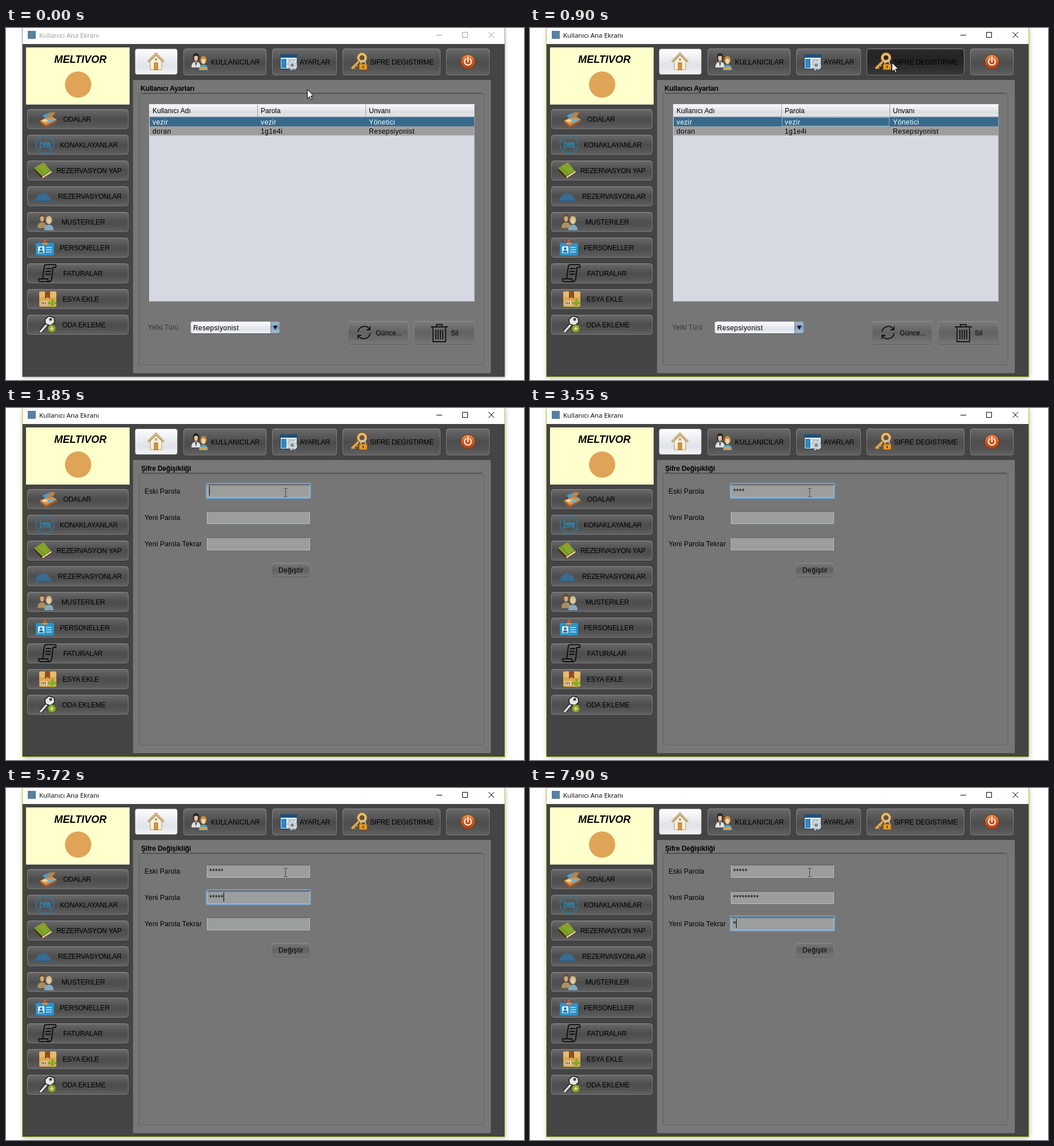
An HTML page that plays this animation: 905 by 616 pixels, repeating every 8000 ms.

```html
<!DOCTYPE html>
<html lang="tr">
<head>
<meta charset="utf-8">
<title>Kullanıcı Ana Ekranı</title>
<style>
html, body { margin: 0; width: 100%; height: 100%; overflow: hidden; background: #fff; }
svg { display: block; width: 905px; height: 616px; font: 12px "Liberation Sans", Arial, sans-serif; }
text { white-space: pre; }
.wide { letter-spacing: .4px; }
.label { letter-spacing: .15px; }
.caps { letter-spacing: -.13px; }
.bold { font-weight: bold; letter-spacing: -.17px; }
.stars { letter-spacing: .33px; }
.brand { font: italic bold 18px "Liberation Sans", sans-serif; }
.frame { fill: #444; filter: drop-shadow(1px 2px 3px rgba(0,0,0,.25)); }
.active .frame { filter: drop-shadow(1px 2px 4px rgba(0,0,0,.3)); }
.edge { fill: none; stroke: #9a9a9a; }
.active .edge { stroke: #a5cf1c; }
.title { font: 11.5px "Open Sans", "Noto Sans", sans-serif; fill: #999; }
.active .title { fill: #000; }
.sys { fill: none; stroke: #999; }
.active .sys { stroke: #000; }
</style>
</head>
<body>
<svg id="stage" viewBox="0 0 905 616" xmlns="http://www.w3.org/2000/svg"></svg>
<script>
const LOOP = 8000;
const svg = document.getElementById('stage');

// ---- drawing helpers ----
const rect = (x, y, w, h, fill, more = '') =>
  `<rect x="${x}" y="${y}" width="${w}" height="${h}" fill="${fill}" ${more}/>`;
const path = (d, fill = 'none', stroke = 'none', w = 1, more = '') =>
  `<path d="${d}" fill="${fill}" stroke="${stroke}" stroke-width="${w}" ${more}/>`;
const disc = (x, y, r, fill, more = '') =>
  `<circle cx="${x}" cy="${y}" r="${r}" fill="${fill}" ${more}/>`;
const text = (x, y, s, cls = '', fill = '') =>
  `<text x="${x}" y="${y}" class="${cls}" ${fill && `fill="${fill}"`}>${s}</text>`;
const group = (id, body) => `<g id="${id}">${body}</g>`;
const at = (x, y, body) => `<g transform="translate(${x} ${y})">${body}</g>`;
const grad = (id, ...colors) =>
  `<linearGradient id="${id}" x2="0" y2="1">${colors.map((c, i) =>
    `<stop offset="${i / (colors.length - 1)}" stop-color="${c}"/>`).join('')}</linearGradient>`;

const button = (x, y, w, h, fill = 'url(#dark)', id = '') =>
  rect(x + .5, y + 1.5, w - 1, h - 1, 'none', 'rx="4" stroke="#333" stroke-opacity=".35"') +
  rect(x + .5, y + .5, w - 1, h - 1, fill, `rx="4" stroke="url(#rim)" ${id && `id="${id}"`}`);

// ---- icons, each drawn from its top left corner, about 32 square ----
const person = (x, y, hair, skin, coat) =>
  path(`M${x - 8} ${y + 18}q0-10 8-10t8 10z`, coat) +
  `<ellipse cx="${x}" cy="${y}" rx="5.5" ry="7" fill="${hair}"/>` +
  path(`M${x - 3.5} ${y - 1}q3.500-3 7 0q0 8-3.500 8t-3.500-8z`, skin);

const icons = {
  home: path('M5 14L15 4 25 14V29H5z', '#f7efd9', '#b79a64') +
    path('M1 15L15 1 29 15', 'none', '#a07f4a', 3.5) + path('M1 14.500L15 1 29 14.500', 'none', '#e0c793', 2) +
    rect(12, 17, 6, 12, '#d6973f', 'stroke="#9a6a2c"') + rect(13, 9, 4, 4, '#b5a27c'),
  users: person(9, 8, '#282322', '#efc19a', '#dfe3e6') + path('M7 17l2 8 2-8z', '#555') +
    person(22, 13, '#c98f38', '#f7d2a6', '#4ca1d6') + rect(15, 25, 13, 5, '#dca045', 'rx="2"'),
  settings: rect(.5, 2.5, 29, 25, '#e8eef2', 'stroke="#173a58"') + rect(0, 2, 30, 6, '#1f4f7a') +
    rect(2, 10, 9, 16, '#2f86c2') + path('M13 12h14M13 16h9', 'none', '#a7b5bf', 2) +
    disc(21, 21, 7, '#d4d9dc', 'stroke="#bcc4c9" stroke-width="4" stroke-dasharray="3 2.500"') +
    disc(21, 21, 3, '#7c878e'),
  key: path('M17 13L2 28', 'none', '#a96d1d', 5) + path('M17 13L2 28', 'none', '#e2b064', 3) +
    path('M5 25l3 3M9 21l3 3', 'none', '#d79b3a', 2.5) +
    disc(20, 9, 6.5, 'none', 'stroke="#8f5a1b" stroke-width="6"') +
    disc(20, 9, 6.5, 'none', 'stroke="#e9bb6c" stroke-width="4"') +
    path('M18 21v-3a4 4 0 0 1 8 0v3', 'none', '#c5c8ca', 2) +
    rect(15, 20, 14, 10, '#e69a25', 'rx="1" stroke="#8a5817"') + rect(21, 23, 2, 4, '#5a3810'),
  power: disc(13, 13, 13, '#7e3514') + disc(13, 13, 12, 'url(#ember)') +
    path('M9.500 8a6 6 0 1 0 7 0M13 5v8', 'none', '#fff', 2, 'stroke-linecap="round"'),
  rooms: path('M1 20L20 12 32 18 12 29z', '#a85c22') + path('M1 17L20 9 31 15 12 25z', '#d9954a') +
    path('M6 8l12-5 4 5-12 5z', '#4d9cc2') + path('M14 12l6-10 8 1-6 9z', '#c87f3a') +
    path('M12 18l10-5 6 3-10 5z', '#6bb0cd') + path('M4 17l6-3 6 3-6 3z', '#f0cf98'),
  stay: disc(16, 16, 15.5, 'none', 'stroke="#2b7aa3" stroke-width="1.500"') +
    path('M8 9v15M8 20h17v4M25 20v-5H13v3', 'none', '#2d86b3', 1.6) + disc(11, 14, 1.6, '#2d86b3') +
    rect(14, 13, 11, 4, 'none', 'rx="1" stroke="#2d86b3" stroke-width="1.500"'),
  book: path('M0 10L17 0 31 17 14 29z', '#82a52a') + path('M0 10L14 24V29L0 14z', '#49301d') +
    path('M14 25L31 14V18L14 29z', '#ead9aa', '#604321') + path('M4 8L19 23', 'none', '#6d8c24', 1.5) +
    path('M8 8l8-5', 'none', '#a88f35', 2),
  bell: path('M3 17a13 12 0 0 1 26 0z', '#386c93') + rect(0, 17, 32, 2, '#315f81', 'rx="1"') +
    disc(16, 4, 1.6, '#386c93'),
  guests: person(9, 8, '#6b4c33', '#cfa87c', '#a98f60') + person(21, 12, '#cdb888', '#e3c8a0', '#86a9bd'),
  badge: rect(0, 6, 32, 22, '#2a93c9', 'rx="3"') + rect(4, 12, 11, 12, '#d9eef6') +
    disc(9.5, 16, 2.3, '#27739d') + path('M5.500 23q0-4 4-4t4 4z', '#27739d') +
    path('M18 14h10M18 18h10M18 22h10', 'none', '#bfe2f1', 1.6) + rect(14, 0, 4, 8, '#c4592c') +
    rect(11, 6, 10, 3, '#e58a3e', 'rx="1"'),
  bill: path('M8 25L11 3q0-3 4-3h15q2 0 1 5h-5L24 24q-1 6-5 6H4q-4 0-3-5h16q0 5 3 5', 'none', '#111', 2) +
    path('M14 7h9M13 12h9M13 17h9', 'none', '#111', 2),
  box: rect(0, 0, 30, 27, '#dda850', 'rx="3"') + rect(0, 0, 30, 10, '#e6bb70', 'rx="3"') +
    path('M10 0h9v13l-4.500-3-4.500 3z', '#8f4d23') + rect(3, 17, 11, 7, '#f3e5c4') +
    path('M5 18v5M8 18v5M11 18v5', 'none', '#60452a', 1.4) +
    path('M23 13v15M15 20.500h15', 'none', '#7fad2b', 4),
  roomKey: path('M16 13L3 28', 'none', '#181818', 6) + path('M16 13L3 28', 'none', '#e0e0e0', 3.5) +
    path('M11 6l7-6 9 3 1 8-7 6-9-3z', '#e6e6e6', '#181818', 1.5) + disc(21, 6, 2.5, '#444') +
    disc(23, 22, 7, '#8da92d', 'stroke="#4a5c16"') + path('M23 19v6M20 22h6', 'none', '#e4edbe', 1.6),
  refresh: path('M2 12A11 11 0 0 1 22 7M23 2v6h-6M23 14A11 11 0 0 1 3 19M2 24v-6h6', 'none', '#111', 1.8) ,
  trash: path('M0 5h30M10 4V1h10v3M4 6V31H26V6M9 10V27M13 10V27M17 10V27M21 10V27', 'none', '#151515', 1.8)
};

// ---- static parts ----
const defs = `<defs>${
  grad('dark', '#6a6a6a', '#5a5a5a', '#4d4d4d', '#535353', '#626262')}${
  grad('hover', '#747474', '#646464', '#545454', '#5a5a5a', '#6a6a6a')}${
  grad('down', '#2b2b2b', '#242424', '#262626', '#2e2e2e', '#3a3a3a')}${
  grad('mid', '#7c7c7c', '#6d6d6d', '#626262', '#6a6a6a', '#797979')}${
  grad('rim', '#8e8e8e', '#7a7a7a', '#787878')}${
  grad('light', '#fdfdfe', '#eef0f3', '#dfe2e8', '#f4f5f8')}${
  grad('head', '#fafafb', '#e9ebee', '#d9dce1', '#e8eaed')}${
  grad('arrow', '#a9bfd2', '#7d9bb6', '#aec5d8')}${
  grad('ember', '#ec9150', '#d1581f', '#b04110')}</defs>`;

const windowFrame =
  rect(29, 0, 842, 610, '#444', 'class="frame"') +
  rect(29, 0, 842, 28, '#fff') +
  '<path class="edge" d="M28.500 0V610.500H871.500V0"/>' +
  rect(38, 5, 14, 14, '#58809f') +
  text(58, 17, 'Kullanıcı Ana Ekranı', 'title') +
  '<path class="sys" d="M752 12.500h10M797.500 7.500h9v9h-9zM843 7l10 10M853 7l-10 10"/>';

const brand = rect(35, 34, 181, 100, '#ffffcc') + disc(126, 99, 23, '#dfa457') +
  '<text x="130" y="61" text-anchor="middle" class="brand">MELTIVOR</text>';

const menu = [
  ['ODALAR', 100, 'rooms', 58, 145], ['KONAKLAYANLAR', 94, 'stay', 52, 188],
  ['REZERVASYON YAP', 88, 'book', 49, 235], ['REZERVASYONLAR', 91, 'bell', 49, 285],
  ['MUSTERILER', 97, 'guests', 54, 324], ['PERSONELLER', 94, 'badge', 52, 370],
  ['FATURALAR', 100, 'bill', 56, 414], ['ESYA EKLE', 99, 'box', 58, 461],
  ['ODA EKLEME', 98, 'roomKey', 57, 504]
].map(([label, x, icon, ix, iy], i) =>
  button(37, 142 + 45 * i, 177, 35) + at(ix, iy, icons[icon]) +
  text(x, 164 + 45 * i, label, 'caps')).join('');

const toolbar =
  button(225, 36, 75, 46, 'url(#light)') + at(247, 44, icons.home) +
  button(310, 36, 145, 47) + at(323, 43, icons.users) + text(358, 64, 'KULLANICILAR') +
  button(465, 36, 113, 47) + at(479, 44, icons.settings) + text(513, 64, 'AYARLAR', 'caps') +
  rect(587, 35, 173, 49, 'none', 'id="btnFocus" rx="5" stroke="#74a8c6" stroke-width="2"') +
  button(588, 36, 171, 47, 'url(#dark)', 'passBtn') +
  at(602, 43, icons.key) + text(636, 64, 'SIFRE DEGISTIRME', 'caps') +
  button(769, 36, 76, 47) + at(794, 46, icons.power);

const panel = rect(222, 91, 625, 513, '#777') +
  rect(233.5, 114.5, 603, 477, '#767676', 'rx="5" stroke="#878787"') +
  rect(232.5, 113.5, 603, 477, '#767676', 'rx="5" stroke="#5a5a5a"') +
  path('M237 114.500H832', 'none', '#585858', 2);

const row = (y, cells, fill) => cells.map((s, i) => text(256 + 189 * i, y, s, 'wide', fill)).join('');
const usersView = group('usersView',
  text(235, 110, 'Kullanıcı Ayarları', 'bold') +
  rect(250, 133, 569, 346, '#d6d9e1') +
  rect(250, 134, 568, 21, 'url(#head)') +
  path('M250 155H818M439.500 134V155M628.500 134V155M818.500 134V479M250 478.500H819', 'none', '#9b9fa7') +
  ['Kullanıcı Adı', 'Parola', 'Unvanı'].map((s, i) => text(256 + 189 * i, 149, s)).join('') +
  rect(251, 156, 567, 16, '#39698a') + rect(251, 172, 567, 16, '#9e9e9e') +
  row(169, ['vezir', 'vezir', 'Yönetici'], '#fff') + row(185, ['doran', '1g1e4i', 'Resepsiyonist']) +
  rect(440.5, 156.5, 187, 15, 'none', 'id="cell" stroke="#87b3d0"') +
  text(248, 528, 'Yetki Türü', '', '#383838') +
  rect(323, 515, 156, 21, '#555', 'rx="4" opacity=".6"') +
  rect(322.5, 513.5, 156, 21, 'url(#light)', 'rx="4" stroke="#8b8f96"') +
  path('M462.500 514H475q3 0 3 3v14q0 3-3 3H462.500z', 'url(#arrow)', '#6d8298') +
  path('M466.500 521h8l-4 7z', '#111') + text(327, 529, 'Resepsiyonist', 'wide') +
  button(597, 513, 106, 40, 'url(#mid)') + at(613, 520, icons.refresh) + text(646, 538, 'Günce...') +
  button(713, 513, 106, 40, 'url(#mid)') + at(742, 518, icons.trash) + text(777, 538, 'Sil'));

const field = (label, i) => {
  const y = 134 + 46 * i;
  return text(242, y + 16, label, 'label') + rect(351, y, 180, 23, '#9c9e9e') +
    path(`M351 ${y + .5}H531`, 'none', '#5f6161') + path(`M351 ${y + 1.5}H531`, 'none', '#858787') +
    path(`M351.500 ${y + 1}V${y + 22.5}H530.500V${y + 1}`, 'none', '#bcbebe') +
    `<text id="stars${i}" class="stars" x="355" y="${y + 16}"></text>`;
};
const passView = group('passView',
  text(236, 110, 'Şifre Değişikliği', 'bold') +
  ['Eski Parola', 'Yeni Parola', 'Yeni Parola Tekrar'].map(field).join('') +
  button(464, 271, 67, 24, 'url(#mid)') + text(476, 288, 'Değiştir', 'wide') +
  group('focus', rect(350, 132, 182, 26, 'none', 'rx="2" stroke="#6f9fce" stroke-width="2"')) +
  rect(355, 137, 1, 16, '#000', 'id="caret"'));

const pointers =
  group('arrowPtr', path('M.5.5V16.500L4.200 13 6.700 18.500 9 17.500 6.500 12H11.500z', '#fff', '#000')) +
  group('beamPtr', path('M-3 -7.500H-1L.5 -6.500 2 -7.500H4M-3 7.500H-1L.5 6.500 2 7.500H4M.5 -7V7', 'none', '#444'));

svg.innerHTML = defs + windowFrame + brand + menu + toolbar + panel + usersView + passView + pointers;

// ---- motion ----
const el = id => document.getElementById(id);
const show = (id, on) => { el(id).style.display = on ? '' : 'none'; };
const move = (id, x, y) => el(id).setAttribute('transform', `translate(${x} ${y})`);

const PRESS = 900, RELEASE = 1010, FOCUS = 1850;
const keys = [
  [FOCUS, 'next'], [2310, 'blink'], [2550, '*'], [2610, '*'], [2860, '*'], [3090, '*'],
  [3550, 'blink'], [3700, '*'], [4020, 'next'], [4490, 'blink'], [4870, '*'], [4940, '*'],
  [5110, '*'], [5320, '*'], [5720, '*'], [6030, '*'], [6260, '*'], [6500, '*'], [6730, '*'],
  [7280, 'blink'], [7360, 'next'], [7900, '*']
];

// The pointer jumps in even steps between rests.
const moves = [
  { start: 220, end: 590, steps: 6, from: [526, 107], to: [632, 60] },
  { start: 1070, end: 1530, steps: 7, from: [632, 60], to: [488, 148] }
];
function pointerAt(t) {
  let pos = moves[0].from;
  for (const m of moves) {
    if (t < m.start) break;
    const gap = (m.end - m.start) / (m.steps - 1);
    const n = Math.min(m.steps, Math.floor((t - m.start) / gap + 1e-6) + 1);
    pos = m.from.map((a, i) => Math.round(a + (m.to[i] - a) * n / m.steps));
  }
  return pos;
}

function typingAt(t) {
  const counts = [0, 0, 0];
  let index = -1, caret = false;
  for (const [time, key] of keys) {
    if (time > t) break;
    if (key === 'next') index++;
    if (key === '*') counts[index]++;
    caret = key !== 'blink';
  }
  return { counts, index, caret };
}

function render(t) {
  const [x, y] = pointerAt(t);
  const form = t >= RELEASE;
  const pressed = t >= PRESS && !form;
  const over = x >= 588 && x < 759 && y >= 36 && y < 83;
  const beam = form && x > 351 && x < 531 && y >= 134 && y < 157;
  svg.classList.toggle('active', t >= PRESS);
  show('cell', t >= PRESS);
  show('usersView', !form);
  show('passView', form);
  show('btnFocus', form && t < FOCUS);
  el('passBtn').setAttribute('fill', `url(#${pressed ? 'down' : over ? 'hover' : 'dark'})`);

  show('arrowPtr', !beam);
  show('beamPtr', beam);
  move(beam ? 'beamPtr' : 'arrowPtr', x, y);

  const { counts, index, caret } = typingAt(t);
  counts.forEach((n, i) => { el('stars' + i).textContent = '*'.repeat(n); });
  show('focus', index >= 0);
  show('caret', caret);
  if (index >= 0) {
    move('focus', 0, 46 * index);
    move('caret', 5 * counts[index], 46 * index);
  }
}

const begin = performance.now();
function tick() {
  render((performance.now() - begin) % LOOP);
  requestAnimationFrame(tick);
}
tick();
</script>
</body>
</html>
```
